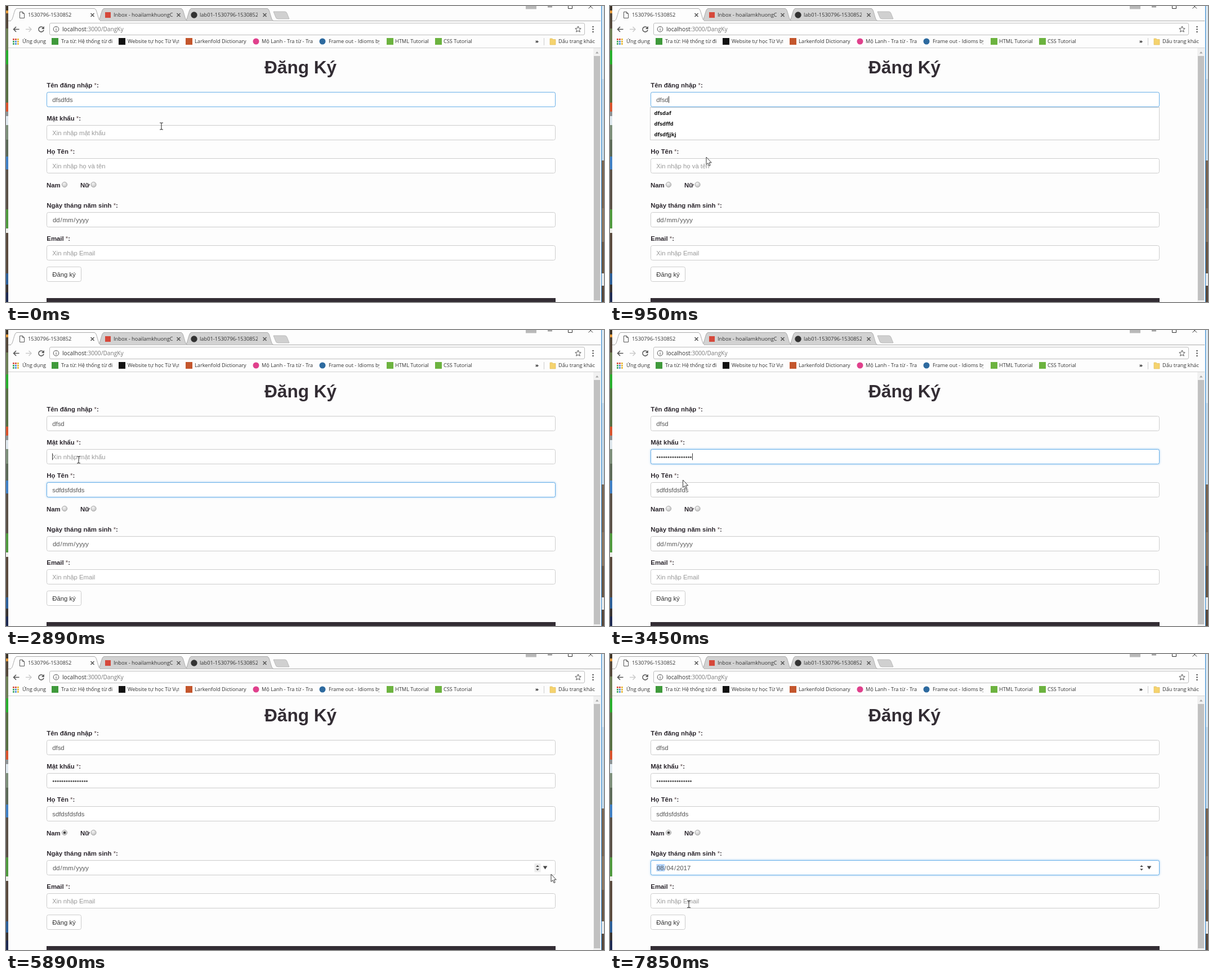
An HTML page that plays this animation: 1062 by 527 pixels, repeating every 8000 ms.

```html
<!DOCTYPE html>
<html lang="vi">
<head>
<meta charset="utf-8">
<title>Đăng Ký</title>
<style>
html, body { margin: 0; width: 100%; height: 100%; overflow: hidden; background: #fdfdfd; }
#stage { display: block; position: absolute; left: 0; top: 0; }
text { white-space: pre; }
.page { font: 11.3px "Liberation Sans", Arial, sans-serif; fill: #555; }
.page .label { font-size: 11.4px; font-weight: bold; fill: #2c272e; }
.page .star { font-weight: normal; fill: #5d4a4a; }
.page .title { font-size: 31.6px; font-weight: bold; fill: #332d34; }
.page .empty { fill: #999; }
.ui { font: 9.2px "Open Sans", "Noto Sans", sans-serif; fill: #333; }
.ui .dim { fill: #777; }
.ui .url { font-size: 10.2px; }
.tabs { font-size: 9.3px; }
.bold { font-size: 9.6px; font-weight: bold; fill: #111; }
.line { fill: none; stroke: #555; stroke-width: 1.5; }
.edge { fill: none; stroke: #ccc; }
.glow { fill: #fff; stroke: #66afe9; }
</style>
</head>
<body>
<svg id="stage" width="1062" height="527" viewBox="0 0 1062 527">
  <defs>
    <radialGradient id="knob" cx=".4" cy=".3" r=".8">
      <stop offset="0" stop-color="#f4f4f4"/><stop offset="1" stop-color="#bbb"/>
    </radialGradient>
    <filter id="blur" x="-5%" y="-50%" width="110%" height="200%"><feGaussianBlur stdDeviation="1.4"/></filter>
  </defs>
  <rect width="1062" height="527" fill="#fdfdfd"/>
  <g id="desktop"></g>
  <g id="chrome" class="ui"></g>
  <g id="page" class="page"></g>
  <g id="lists" class="ui"></g>
  <g id="pointer"></g>
</svg>
<script>
const $ = id => document.getElementById(id);
const rect = (x, y, w, h, fill, more = '') =>
  `<rect x="${x}" y="${y}" width="${w}" height="${h}" fill="${fill}" ${more}/>`;
const path = (d, more = 'class="line"') => `<path d="${d}" ${more}/>`;
const text = (x, y, s, cls = '') => `<text x="${x}" y="${y}" class="${cls}">${s}</text>`;
const dot = (x, y, r, fill) => `<circle cx="${x}" cy="${y}" r="${r}" fill="${fill}"/>`;
const clip = (x, w, y, s) => `<svg x="${x}" y="${y - 14}" width="${w}" height="20">${text(0, 14, s)}</svg>`;

// Slivers of desktop beside the window
function bands(x, w, list) {
  return list.map(([y, fill], i) => rect(x, y, w, (list[i + 1] || [527])[0] - y, fill)).join('');
}
$('desktop').innerHTML =
  bands(0, 4, [[0, '#3d3428'], [8, '#e59a3a'], [13, '#54483a'], [40, '#6d7f55'], [79, '#28b02c'], [104, '#587043'],
    [172, '#d9532c'], [188, '#8d9294'], [196, '#dfe8ee'], [212, '#7d8f7a'], [238, '#5c6a58'], [268, '#3f7fc4'],
    [291, '#5b5147'], [362, '#4f9a3d'], [396, '#eeeeea'], [404, '#5a4a3d'], [476, '#2c5f99'], [496, '#39332f'],
    [510, '#1d2a52']]) +
  bands(1058, 4, [[0, '#d9e6ef'], [130, '#c3d7e6'], [275, '#7a6653'], [360, '#8b7762'], [420, '#6b5847'],
    [476, '#e9e9e9'], [498, '#59493c']]) +
  rect(1057, 0, 1, 527, '#2b83cc');

const tab = (l, r, fill) => path(
  `M${l},26.5C${l + 5},26 ${l + 6},4.5 ${l + 11},4.5H${r - 11}C${r - 6},4.5 ${r - 5},26 ${r},26.5`,
  `fill="${fill}" stroke="#aaa"`);
const cross = (x, y, r) => path(`M${x - r},${y - r}l${2 * r},${2 * r}m0,${-2 * r}l${-2 * r},${2 * r}`);
const apps = ['#d64a3a', '#d64a3a', '#e8b62c', '#3aa757', '#4285d6', '#e8b62c', '#3aa757', '#4285d6', '#e8b62c'];
const mark = (x, fill, round) => round ? dot(x + 6, 63, 5.5, fill) : rect(x, 57, 12, 12, fill);
const bookmarks = [
  [81, '#3f9a3b', 0, 98, 92, 'Tra từ: Hệ thống từ điển'],
  [200, '#111', 0, 216, 92, 'Website tự học Từ Vựng'],
  [319, '#c4562c', 0, 335, 92, 'Larkenfold Dictionary'],
  [438, '#e0408c', 1, 454, 91, 'Mộ Lanh - Tra từ - Tra từ'],
  [556, '#2d6a9f', 1, 573, 90, 'Frame out - Idioms by topic'],
  [676, '#6cb33f', 0, 691, 70, 'HTML Tutorial'],
  [762, '#6cb33f', 0, 777, 70, 'CSS Tutorial']
];
$('chrome').innerHTML =
  path('M4,26.5H1056', 'stroke="#aaa"') +
  path('M475,10H495Q498,10 499,13L503,23H483Q480,23 479,20Z', 'fill="#d0d0d0" stroke="#bbb"') +
  tab(318, 475, '#d2d2d2') + tab(163, 322, '#d2d2d2') + tab(8, 168, '#fdfdfd') +
  path('M9,26.5H167', 'stroke="#fdfdfd" stroke-width="2"') +
  path('M24.5,10.5H29.5L32.5,13.5V21.5H24.5ZM29.5,10.5V13.5H32.5', 'fill="#fff" stroke="#555"') +
  rect(176, 11, 10, 10, '#d6483b') + dot(334, 16, 5.7, '#333') +
  `<g class="tabs">${clip(39, 100, 19, '1530796-1530852')}${clip(191, 105, 19, 'Inbox - hoailamkhuongC')}` +
  `${clip(344, 103, 19, 'lab01-1530796-1530852')}</g>` +
  cross(153.5, 16, 3) + cross(306.5, 16, 3) + cross(459.5, 16, 3) +
  rect(923, 0, 19, 5.5, '#b9b9b9') +
  path('M962,1.5H970M998.5,-2V4.5H1005.5V-2M1034.5,-3l7.5,7.5M1042,-3l-7.5,7.5', 'fill="none" stroke="#333"') +
  path('M23.5,41.5H13.5M18,37L13.5,41.5L18,46') +
  path('M35,41.5H45M40.5,37L45,41.5L40.5,46', 'fill="none" stroke="#ccc" stroke-width="1.5"') +
  path('M66,38.5A4.6,4.6 0 1 0 67,42.5') + path('M67.8,36V41H62.8Z', 'fill="#555"') +
  rect(77.5, 30.5, 950, 21, '#fff', 'rx="2.5" stroke="#bdbdbd"') +
  path('M89,40.5V44M89,38V39.2', 'stroke="#555"') +
  '<circle cx="89" cy="41.2" r="4.8" fill="none" stroke="#555"/>' +
  text(100, 45, 'localhost<tspan class="dim">:3000/DangKy</tspan>', 'url') +
  path('M1016,36L1017.5,39.7L1021.2,40L1018.4,42.5L1019.3,46.2L1016,44.2L1012.7,46.2L1013.6,42.5L1010.8,40L1014.5,39.7Z',
    'fill="none" stroke="#555"') +
  [37, 41.5, 46].map(y => dot(1042.5, y, 1.3, '#555')).join('') +
  apps.map((c, i) => rect(12 + i % 3 * 4, 58 + (i / 3 | 0) * 4, 2.8, 2.8, c)).join('') +
  text(29, 66, 'Ứng dụng') +
  bookmarks.map(([x, fill, round, tx, w, s]) => mark(x, fill, round) + clip(tx, w, 66, s)).join('') +
  text(940, 66, '»', 'bold') + path('M955.5,57V70', 'stroke="#ccc"') +
  path('M966,58H970L971.5,59.5H976V69H966Z', 'fill="#f5d36e" stroke="#dcb650" stroke-width=".6"') +
  text(981, 66, 'Dấu trang khác') +
  path('M4,74.5H1056', 'stroke="#d2d2d2"') +
  rect(1043, 75, 13, 452, '#f1f1f1') + rect(1044, 89, 11, 435, '#c1c1c1') +
  path('M1047,84.5L1049.7,81L1052.4,84.5Z', 'fill="#a3a3a3"');

const NAME = 0, PASS = 1, FULL = 2, DATE = 3, MAIL = 4;
const tops = [153.5, 212.5, 271.5, 367.5, 426.5];
const labels = ['Tên đăng nhập', 'Mật khẩu', 'Họ Tên', 'Ngày tháng năm sinh', 'Email'];
const hints = ['', 'Xin nhập mật khẩu', 'Xin nhập họ và tên', 'dd/mm/yyyy', 'Xin nhập Email'];
const box = (y, cls, more) => `<rect x="72.5" y="${y}" width="903" height="26" rx="3" class="${cls}" ${more}/>`;
const radio = x => `<circle cx="${x}" cy="318" r="4.6" fill="url(#knob)" stroke="#999" stroke-width=".8"/>`;
const tri = (x, y, w, h) => path(`M${x - w},${y}H${x + w}L${x},${y + h}Z`, 'fill="#444"');

$('page').innerHTML =
  text(459, 119.5, 'Đăng Ký', 'title') +
  tops.map((y, i) =>
    text(72.3, y - 8.4, `${labels[i]} <tspan class="star">*</tspan>:`, 'label') +
    box(y, 'edge', 'style="fill:#fff"') +
    `<g id="glow${i}">${i === NAME ? '' : box(y, 'glow', 'style="stroke-width:3;opacity:.4" filter="url(#blur)"')}${box(y, 'glow', '')}</g>` +
    (i === DATE ? rect(82.5, 374, 14.5, 13, '#b3d4fc', 'id="picked"') : '') +
    `<text id="value${i}" x="${i === DATE ? 83 : 82.3}" y="${y + 17.3}"></text>`
  ).join('') +
  text(72, 323, 'Nam', 'label') + text(132, 323, 'Nữ', 'label') + radio(104, 318) + radio(155.5, 318) +
  `<g id="checked">${dot(104, 318, 2.3, '#444')}</g>` +
  `<g id="spin">${rect(938.5, 373, 11, 15.5, '#ececec', 'id="spinBack"')}` +
  `${tri(944, 379, 2.8, -3)}${tri(944, 382.5, 2.8, 3)}${tri(957.5, 377.5, 3.8, 6)}</g>` +
  rect(72.5, 464.5, 61, 26, '#fff', 'rx="3" stroke="#ccc"') +
  `<text x="82.3" y="481.8" style="fill:#333">Đăng ký</text>` +
  rect(72, 520, 904, 7, '#332d34') +
  rect(0, 0, 1, 12, '#333', 'id="caret"');

$('pointer').innerHTML =
  `<g id="arrow">${path('M0,0V13.4L3,10.7L5.1,15.5L7.2,14.6L5.1,9.9H9.2Z', 'fill="#fff" stroke="#222" stroke-width=".9"')}</g>` +
  `<g id="beam">${path('M-3,-6H-1L0,-5L1,-6H3M0,-5V5M-3,6H-1L0,5L1,6H3', 'fill="none" stroke="#333" stroke-width="1.1"')}</g>`;

const LOOP = 8000;
const ticks = [0, 130, 400, 540, 680, 810, 950, 1090, 1230, 1370, 1510, 1650, 1770, 1930, 2060, 2200, 2330, 2470,
  2600, 2740, 2890, 3020, 3160, 3300, 3440, 3580, 3750, 3890, 4030, 4170, 4310, 4450, 4580, 4710,
  4830, 4970, 5100, 5230, 5370, 5500, 5640, 5770, 5890, 6030, 6180, 6460, 6600, 6750, 6890, 7040,
  7440, 7580, 7720, 7850];

// [time, focused field, its text]
const edits = [
  [-530, NAME, 'dfsdfds'], [400, NAME, 'dfsdfd'], [540, NAME, 'dfsdf'], [680, NAME, 'dfsd'],
  [1510, FULL, ''], [1930, FULL, 's'], [2060, FULL, 'sdf'], [2200, FULL, 'sdfds'],
  [2330, FULL, 'sdfdsfds'], [2470, FULL, 'sdfdsfdsfds'],
  [2890, PASS, ''], [3020, PASS, '•'.repeat(5)], [3160, PASS, '•'.repeat(11)], [3300, PASS, '•'.repeat(16)],
  [4830, -1, ''], [6460, DATE, ''], [7580, DATE, '08/04/2017']
];
const history = { [NAME]: ['dfsdaf', 'dfsdffd', 'dfsdfjjkj'], [FULL]: ['sdfdsf', 'sdfs', 'sdfsdf', 'sdfdfs'] };

// [time, x, y] of the pointer's hot spot
const route = [
  [0, 276, 214], [130, 290, 221], [400, 262, 228], [950, 171, 269], [1230, 168, 274], [1370, 165, 282],
  [1510, 163, 276], [1770, 163, 273], [2470, 163, 273], [2740, 138, 238], [2890, 129, 231], [3300, 129, 232],
  [3580, 130, 302], [3750, 126, 306], [4030, 110, 317], [4450, 102, 314], [4830, 102, 315],
  [5100, 300, 350], [5370, 800, 416], [5500, 1003, 428], [5770, 1000, 396], [5890, 968, 392],
  [6030, 956, 384], [6180, 952, 381], [6460, 952, 381], [6600, 860, 398], [6890, 330, 455],
  [7040, 244, 470], [7440, 240, 469], [7580, 236, 468], [7720, 180, 456], [7850, 140, 445.5]
];

function pointerAt(t) {
  const n = route.findIndex(k => k[0] > t);
  if (n < 0) return route[route.length - 1].slice(1);
  const [t0, x0, y0] = route[n - 1], [t1, x1, y1] = route[n];
  const p = (t - t0) / (t1 - t0);
  return [x0 + (x1 - x0) * p, y0 + (y1 - y0) * p];
}

const spaced = s => s.split(/(\/)/).map((p, i) => `<tspan dx="${i ? .9 : 0}">${p}</tspan>`).join('');

function suggestions(field, typed) {
  const found = typed ? (history[field] || []).filter(s => s.startsWith(typed)) : [];
  if (!found.length) return '';
  const y = tops[field] + 27;
  return rect(71.5, y, 904, 19.3 * found.length, '#fff', 'stroke="#ccc"') +
    found.map((s, i) => text(78.5, y + 13.2 + 19.3 * i, s, 'bold')).join('');
}

function calendar(px, py) {
  const cell = (col, row) => [80 + col * 27.3, 445 + row * 17.5];
  let out = rect(72.5, 394.5, 207, 150, '#fff', 'stroke="#aaa"') +
    text(82, 413.5, 'tháng 4 năm 2017', 'bold') + tri(174, 408, 3, 4) +
    [217, 236, 255].map(x => rect(x, 402, 17, 16, '#f5f5f5', 'stroke="#ccc" rx="1.5"')).join('') +
    path('M227.5,407V413L223.5,410ZM261.5,407V413L265.5,410Z', 'fill="#555"') + dot(244.5, 410, 2, '#555') +
    rect(79.5, 425.5, 192, 115, 'none', 'stroke="#ccc"') + rect(80, 426, 191, 18, '#f5f5f5');
  const add = (x, y, s, cls) => out += `<text x="${x + 13.6}" y="${y + 12.4}" text-anchor="middle" class="${cls}">${s}</text>`;
  ['T2', 'T3', 'T4', 'T5', 'T6', 'T7', 'CN'].forEach((s, i) => add(cell(i, 0)[0], 426, s, 'dim'));
  for (let i = 0; i < 35; i++) {
    const [x, y] = cell(i % 7, i / 7 | 0), day = i - 4;
    if (px >= x && px < x + 27.3 && py >= y && py < y + 17.5) out += rect(x, y, 27.3, 17.5, '#dbe7f8');
    add(x, y, day > 0 ? day : day + 31, day > 0 ? '' : 'dim');
  }
  return out;
}

const show = (id, on) => $(id).style.display = on ? '' : 'none';

function draw(t) {
  const values = hints.map(() => '');
  const focusTimes = [];
  let focus = -1, last = 0;
  for (const [at, field, s] of edits) {
    if (at > t) break;
    if (field !== focus) focusTimes.push([at, field]);
    if (field >= 0) values[field] = s;
    focus = field;
    last = at;
  }
  const since = focusTimes[focusTimes.length - 1][0];
  const previous = focusTimes.length > 1 ? focusTimes[focusTimes.length - 2][1] : -1;
  const lit = Math.min(1, (t - since) / 150);

  tops.forEach((_, i) => {
    $('glow' + i).style.opacity = i === focus ? lit : i === previous ? 1 - lit : 0;
    const el = $('value' + i), s = values[i] || hints[i];
    if (i === DATE) el.innerHTML = spaced(s);
    else el.textContent = s;
    el.setAttribute('class', values[i] || i === DATE ? '' : 'empty');
  });

  const typing = focus >= 0 && focus !== DATE;
  show('caret', typing && Math.floor((t - last) / 530) % 2 === 0);
  if (typing) {
    const w = values[focus] ? $('value' + focus).getComputedTextLength() : 0;
    $('caret').setAttribute('x', Math.round(82.3 + w));
    $('caret').setAttribute('y', tops[focus] + 7);
  }

  const [x, y] = pointerAt(t);
  const over = tops.findIndex(top => x > 72 && x < 976 && y >= top - .5 && y < top + 27);
  const popup = focus === DATE && !values[DATE];
  const list = popup ? calendar(x, y) : suggestions(focus, values[focus]);
  $('lists').innerHTML = list;
  show('checked', t >= 4970);
  show('picked', focus === DATE);
  show('spin', focus === DATE || over === DATE);
  show('spinBack', over === DATE && focus !== DATE);

  const covered = list && (popup ? x < 280 && y > 394 : y > tops[focus] + 27 && y < 240);
  const beam = over >= 0 && over !== DATE && !covered;
  show('beam', beam);
  show('arrow', !beam);
  $('pointer').setAttribute('transform', `translate(${x} ${y})`);
}

let shown = -1;
function frame() {
  const t = performance.now() % LOOP;
  const tick = ticks.filter(k => k <= t).pop();
  if (tick !== shown) draw(shown = tick);
  requestAnimationFrame(frame);
}
frame();
</script>
</body>
</html>
```
